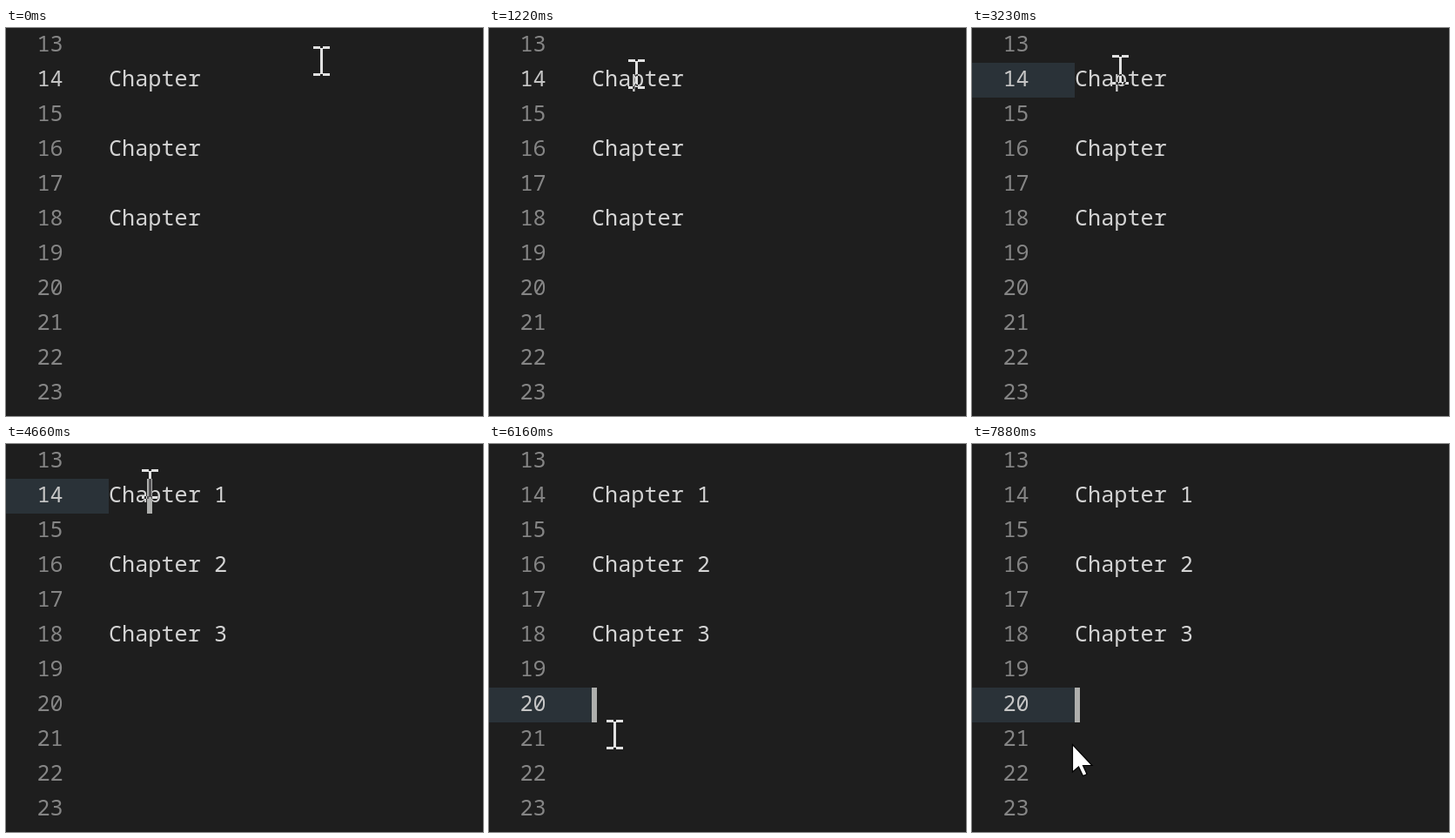
Recreate the animation shown at these times as an HTML page with a canvas. Size 548 by 446 pixels, loop 8000 ms.

```html
<!DOCTYPE html>
<html lang="en">
<head>
<meta charset="utf-8">
<title>Numbering lines in an editor</title>
<style>
html, body { margin: 0; width: 100%; height: 100%; overflow: hidden; background: #1e1e1e; }
canvas { display: block; }
</style>
</head>
<body>
<canvas id="stage" width="548" height="446"></canvas>
<script>
const ctx = document.getElementById('stage').getContext('2d');
const LOOP = 8000, ROW = 40, FIRST_LINE = 13, LAST_LINE = 23;

// The picture advances in ticks, as in a screen recording
const TICK = 100.7;
const SELECT = 17, TYPE = 37, LEAVE = 58, ARROW = 76;
const BLINK = 4.83;

// Pointer strokes, each starting where the last one ended; via bends the path
const home = { x: 362.5, y: 38 };
const strokes = [
  { from: 0, to: 8, x: 208.5, y: 76, via: { x: 500, y: 143 } },
  { from: 8, to: 12, x: 169.5, y: 53 },
  { from: 16, to: 22, x: 170.5, y: 48 },
  { from: 45, to: 46, x: 165.5, y: 46 },
  { from: 46, to: 49, x: 122.5, y: 315, via: { x: 77, y: 130 } },
  { from: 50, to: 51, x: 124.5, y: 298 },
  { from: 52, to: 54, x: 141.5, y: 298 },
  { from: 60, to: 61, x: 144.5, y: 334 },
  { from: 61, to: 63, x: 144.5, y: 352 },
  { from: 69, to: 74, x: 124.5, y: 352 },
  { from: 75, to: 78, x: 115, y: 345 }
];

const mix = (a, b, u) => ({ x: a.x + (b.x - a.x) * u, y: a.y + (b.y - a.y) * u });

function pointerAt(tick) {
  let pos = home;
  for (const s of strokes) {
    if (tick <= s.from) break;
    const u = Math.min(1, (tick - s.from) / (s.to - s.from));
    pos = s.via ? mix(mix(pos, s.via, u), mix(s.via, s, u), u) : mix(pos, s, u);
  }
  return pos;
}

const rowTop = line => (line - FIRST_LINE) * ROW;

function rect(color, x, y, w, h) {
  ctx.fillStyle = color;
  ctx.fillRect(x, y, w, h);
}

function text(str, x, line, color) {
  ctx.fillStyle = color;
  ctx.fillText(str, x, rowTop(line) + 27);
}

// The text pointer inverts what lies under it
function drawIBeam({ x, y }) {
  ctx.globalCompositeOperation = 'difference';
  ctx.fillStyle = '#fff';
  ctx.beginPath();
  for (const top of [y - 17, y + 14]) {
    ctx.rect(x - 9.5, top, 8, 3);
    ctx.rect(x + 1.5, top, 8, 3);
  }
  ctx.rect(x - 1.5, y - 15, 3, 30);
  ctx.fill();
  ctx.globalCompositeOperation = 'source-over';
}

function drawArrow({ x, y }) {
  ctx.save();
  ctx.translate(x, y);
  const shape = new Path2D('M.5 .5V32L7.5 26L12.5 36.5L17 34.5L12.5 24.5H23Z');
  ctx.fillStyle = '#fff';
  ctx.fill(shape);
  ctx.strokeStyle = '#000';
  ctx.lineWidth = 1.2;
  ctx.stroke(shape);
  ctx.restore();
}

function draw(tick) {
  const left = tick >= LEAVE;
  const active = left ? 20 : 14;
  rect('#1e1e1e', 0, 0, 548, 446);
  if (tick >= SELECT) rect('#2a3238', 0, rowTop(active), 118, ROW);

  ctx.font = '500 25.2px "Noto Sans Mono", "DejaVu Sans Mono", monospace';
  for (let line = FIRST_LINE; line <= LAST_LINE; line++)
    text(line, 35.5, line, line === active ? '#c6c6c6' : '#858585');
  for (let n = 1; n <= 3; n++)
    text(tick < TYPE ? 'Chapter' : `Chapter ${n}`, 118, 12 + 2 * n, '#d4d4d4');

  const sinceClick = tick - (left ? LEAVE : SELECT);
  if (sinceClick >= 0 && Math.floor(sinceClick / BLINK) % 2 === 0)
    rect('#aeafad', left ? 118 : 162, rowTop(active), 6, ROW);

  (tick < ARROW ? drawIBeam : drawArrow)(pointerAt(tick));
}

const start = performance.now();
function frame() {
  const t = (performance.now() - start) % LOOP;
  draw(Math.floor(t / TICK));
  requestAnimationFrame(frame);
}
frame();
</script>
</body>
</html>
```
